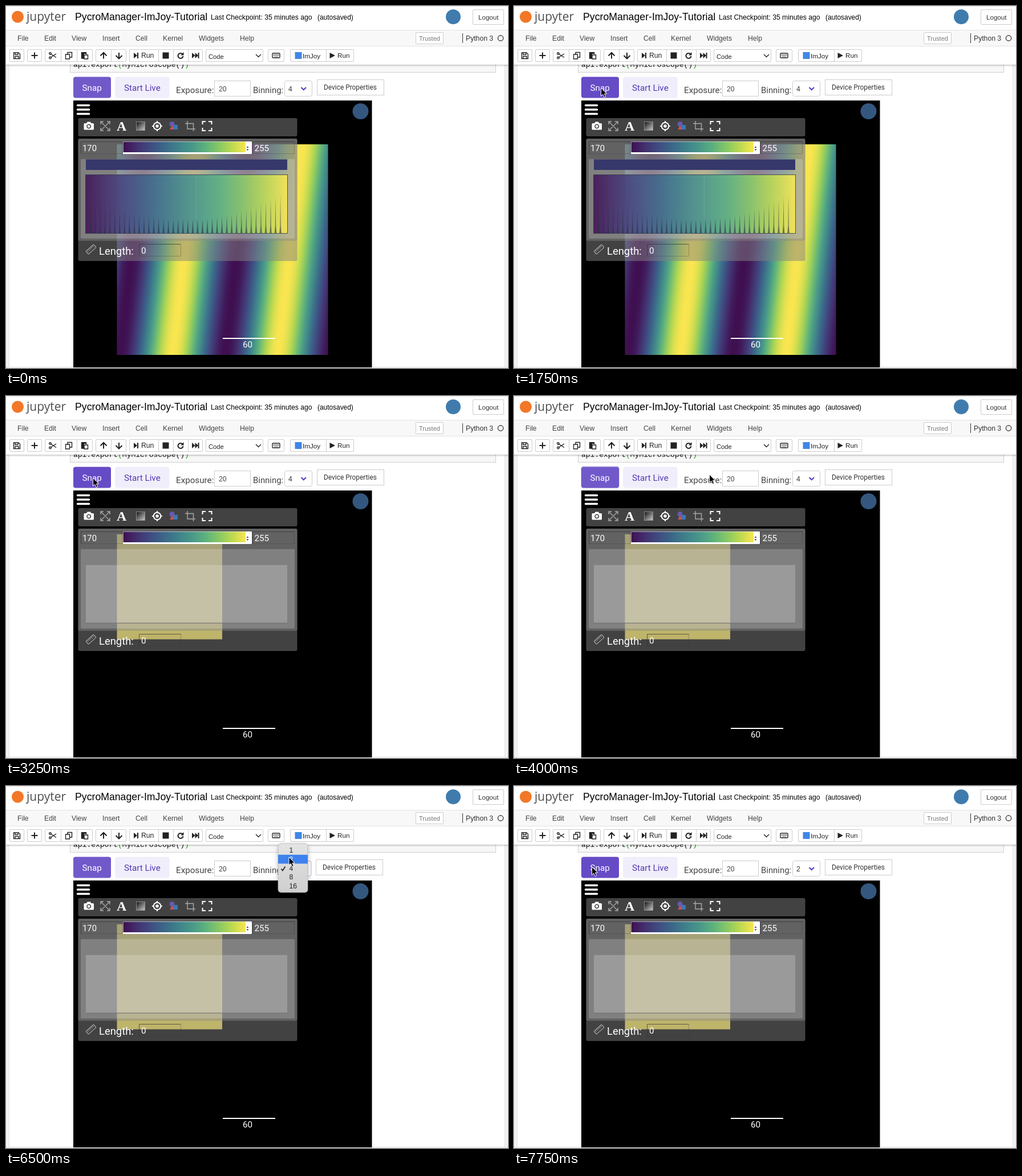
An HTML page that plays this animation: 880 px wide and 636 px high, repeating every 8 s.

```html
<!DOCTYPE html>
<html lang="en">
<head>
<meta charset="utf-8">
<title>Notebook viewer</title>
<style>
html, body { margin: 0; width: 100%; height: 100%; overflow: hidden; background: #fff; }
svg { display: block; width: 880px; height: 636px; }
text { font: 12.2px "Liberation Sans", Arial, sans-serif; white-space: pre; }
.ui { font: 15.2px Roboto, sans-serif; }
.mono { font: 13px "Liberation Mono", monospace; }
.btn { fill: #fff; stroke: #ccc; }
.line { fill: none; stroke: currentColor; stroke-width: 1.4; }
.thick { stroke-width: 2; }
</style>
</head>
<body>
<svg viewBox="0 0 880 636">
  <defs>
    <linearGradient id="stripes" gradientUnits="userSpaceOnUse" x1="200" y1="613" x2="382.1" y2="633.9" spreadMethod="repeat"></linearGradient>
    <linearGradient id="map"></linearGradient>
    <linearGradient id="gray" x2="1" y2="1"><stop stop-color="#111"/><stop offset="1" stop-color="#ccc"/></linearGradient>
    <linearGradient id="shade" x2="0" y2="1"><stop stop-color="#000" stop-opacity=".2"/><stop offset="1" stop-color="#000" stop-opacity="0"/></linearGradient>
    <linearGradient id="menuBg" x2="0" y2="1"><stop stop-color="#e4e4e4"/><stop offset="1" stop-color="#cfcfcf"/></linearGradient>
    <clipPath id="page"><rect y="103" width="880" height="533"/></clipPath>
    <filter id="soft" x="-40%" y="-30%" width="180%" height="170%"><feDropShadow dx="0" dy="4" stdDeviation="4" flood-opacity=".25"/></filter>
  </defs>

  <!-- page -->
  <rect width="880" height="636" fill="#fff"/>
  <rect y="103" width="5" height="533" fill="#f2f2f2"/>
  <rect x="875" y="103" width="5" height="533" fill="#f2f2f2"/>
  <path d="M5.5 103V635M874.5 103V635" stroke="#e0e0e0"/>
  <g clip-path="url(#page)">
    <rect x="112.5" y="90.5" width="746" height="26" fill="#f7f7f7" stroke="#cfcfcf"/>
    <text class="mono" x="118" y="107" fill="#111">api.export<tspan fill="#0a0">(</tspan>MyMicroscope()<tspan fill="#0a0">)</tspan></text>
  </g>
  <rect y="103" width="880" height="4" fill="url(#shade)"/>

  <!-- header -->
  <circle cx="20.5" cy="19" r="10.5" fill="#f37726"/>
  <text x="36" y="25.5" fill="#4e4e4e" style="font:21px 'Open Sans',sans-serif">jupyter</text>
  <text x="121" y="24.5" style="font-size:17.7px">PycroManager-ImJoy-Tutorial</text>
  <text x="359" y="24">Last Checkpoint: 35 minutes ago</text>
  <text x="546" y="24" style="font-size:11.9px">(autosaved)</text>
  <circle cx="784" cy="19" r="13" fill="#3f7cad"/>
  <rect class="btn" x="818.5" y="6.5" width="54" height="26" rx="1.5"/>
  <text x="828" y="23.5" fill="#333" style="font-size:11.6px">Logout</text>
  <rect y="42" width="880" height="29" fill="#f8f8f8"/>
  <path d="M0 .5H880M0 42.5H880M0 70.5H880" stroke="#e3e3e3"/>
  <g id="menuBar" fill="#444"></g>
  <rect class="btn" x="718.5" y="46.5" width="48" height="20" rx="1"/>
  <text x="724" y="60.5" fill="#777" style="font-size:11px">Trusted</text>
  <path d="M800.5 48V65" stroke="#333"/>
  <text x="806" y="60.5" fill="#333">Python 3</text>
  <circle cx="867" cy="56.5" r="4.7" class="line" color="#444"/>

  <!-- notebook toolbar -->
  <g id="bar"></g>
  <g color="#222" fill="#222">
    <path class="line" d="M13.5 82H22L24.5 84.5V92.5H13.5ZM16 82V85.5H21V82M16 92V88.5H22V92"/>
    <path class="line thick" d="M44.5 87H55.5M50 81.5V92.5M165.5 87.5L171 82 176.5 87.5M171 82.5V92.5M192.5 87L198 92.5 203.5 87M198 92V82"/>
    <path class="line" d="M78 84L88 90.5M78 90.5L88 84"/>
    <g class="line">
      <circle cx="77.5" cy="83.5" r="1.8"/><circle cx="77.5" cy="91" r="1.8"/>
      <path d="M108 85V81.5H115.5V90H112M104.5 85H111.5V93H104.5Z"/>
      <path d="M136.5 92H132.5V82H140.5V85M137 86H143.5V93H137Z"/>
    </g>
    <path d="M132 81H141V84H137V92H132Z"/>
    <path d="M224 82V92L230 87ZM230 82H232V92H230Z"/>
    <rect x="274.5" y="81.5" width="11" height="11"/>
    <path class="line thick" d="M309.5 84.5A4.5 4.5 0 1 0 310.5 88"/>
    <path d="M311.5 81V86.5H306Z"/>
    <path d="M326 82V92L331.5 87ZM331.5 82V92L337 87ZM336.5 82H338.5V92H336.5Z"/>
    <path class="line" d="M438 85L442.5 89.5 447 85"/>
    <rect class="line" x="467" y="83" width="13" height="8" rx="1"/>
    <path d="M469 85.5H478.5M469 87H478.5M470.5 89H477" stroke="#222" stroke-dasharray="1.2 .8"/>
    <rect x="506.5" y="81" width="12" height="12" fill="#3f86e6"/>
    <path d="M567.5 82V92L577 87Z"/>
    <text x="237" y="91">Run</text>
    <text x="355" y="92.5" style="font-size:11.2px">Code</text>
    <text x="520" y="91.5" style="font-size:11.7px">ImJoy</text>
    <text x="581" y="91" style="font-size:11.7px">Run</text>
  </g>

  <!-- control row -->
  <rect id="halo" x="117" y="123" width="68" height="39" rx="5" fill="#d9d2f2"/>
  <rect id="snap" x="118" y="124.5" width="66" height="37" rx="4"/>
  <text class="ui" x="133.5" y="149" fill="#fff">Snap</text>
  <rect x="191" y="124.5" width="95.5" height="37" rx="4" fill="#f1eefb"/>
  <text class="ui" x="207" y="149" fill="#5238b4">Start Live</text>
  <g fill="#444">
    <text class="ui" x="298" y="152.5">Exposure:</text>
    <rect class="btn" x="365.5" y="131.5" width="63" height="27"/>
    <text x="373" y="150">20</text>
    <text class="ui" x="433" y="152.5" style="font-size:14.9px">Binning:</text>
  </g>
  <rect id="select" class="btn" x="488.5" y="131.5" width="48" height="27" rx="3"/>
  <text id="bin" x="495" y="149.5" fill="#333"></text>
  <path d="M517.5 143L521.7 147.2 526 143" fill="none" stroke="#5740c0" stroke-width="2.2"/>
  <g id="props">
    <rect class="btn" x="545.5" y="129.5" width="117" height="27"/>
    <text class="ui" x="557" y="147" fill="#333" style="font-size:11.9px">Device Properties</text>
  </g>

  <!-- viewer -->
  <rect x="118" y="166" width="523.5" height="469" fill="#000"/>
  <rect id="wave" x="194.5" y="243" width="370" height="370" fill="url(#stripes)"/>
  <rect id="patch" x="194.5" y="243" width="184.5" height="184.5" fill="#f9e550"/>
  <path d="M125.5 174.5H145.5M125.5 182H145.5M125.5 189.5H145.5" stroke="#fff" stroke-width="3.5" stroke-linecap="round"/>
  <circle cx="621.5" cy="185" r="14" fill="#34577f"/>
  <path d="M380 584H472" stroke="#fff" stroke-width="2"/>
  <text class="ui" x="415" y="600" fill="#fff">60</text>

  <rect x="126.5" y="197" width="384" height="32" rx="3" fill="#424242"/>
  <g color="#fff" fill="#fff">
    <path fill-rule="evenodd" d="M138 206H141L142.5 203.5H148L149.5 206H152.5Q154 206 154 207.5V216Q154 217.500 152.5 217.5H138Q136.5 217.5 136.5 216V207.5Q136.5 206 138 206ZM145.2 207.5A4 4 0 1 0 145.3 207.5Z"/>
    <circle cx="145.2" cy="211.5" r="2.4"/>
    <path class="line" color="#aaa" d="M167 204L181 218M181 204L167 218M166 208V203H171M177 203H182V208M182 214V219H177M171 219H166V214"/>
    <text x="194" y="219" style="font:bold 24px 'Liberation Serif',serif">A</text>
    <rect x="228.5" y="203.5" width="15" height="15" fill="url(#gray)" stroke="#999" stroke-width=".8"/>
    <circle class="line thick" cx="265" cy="211" r="6.3"/><circle cx="265" cy="211" r="2.8"/>
    <path class="line thick" d="M265 202V205M265 217V220M256 211H259M271 211H274"/>
    <circle cx="291" cy="207.5" r="4.5" fill="#6658b0"/>
    <rect x="293" y="209" width="8" height="8" fill="#3978b8"/>
    <path d="M287 217L291 209.5 295 217Z" fill="#c55358"/>
    <path class="line" color="#aaa" d="M314 206.5H328.5V220M318 202V216H332"/>
    <path class="line thick" d="M344.500 208V203H350M355 203H360.5V208M360.5 214V219H355M350 219H344.5V214"/>
  </g>

  <rect x="126.5" y="233" width="384" height="215" rx="3" fill="rgba(132,132,132,.5)"/>
  <rect x="126.5" y="233" width="384" height="179.5" rx="3" fill="rgba(137,137,137,.45)"/>
  <rect x="131" y="269" width="375" height="139.5" rx="2" fill="rgba(248,248,248,.2)"/>
  <rect x="140" y="297" width="353" height="102.5" fill="rgba(237,237,237,.23)"/>
  <path id="base" d="M140 399H493" stroke="#666" stroke-width="1.2"/>
  <g id="hist">
    <rect x="140" y="269.5" width="353" height="18.5" fill="#36376b"/>
    <rect x="139.5" y="296.5" width="354" height="103" fill="url(#map)" fill-opacity=".88" stroke="#333546" stroke-opacity=".8"/>
    <path d="M333.5 297V374" stroke="#b5c5b5" stroke-opacity=".25"/>
    <path id="spikes" fill="#2b3148" fill-opacity=".6"/>
  </g>
  <g id="fields"></g>
  <rect x="205" y="238" width="226" height="22" rx="1.5" fill="#fff"/>
  <rect x="205.5" y="238.5" width="214.5" height="18.5" fill="url(#map)"/>
  <path d="M421.5 249L423.5 246.5 425.5 249ZM421.5 251.5L423.5 254 425.5 251.5Z" fill="#333"/>
  <g fill="#fff">
    <text class="ui" x="134" y="254.5" style="font-size:14.8px">170</text>
    <text class="ui" x="435.5" y="254.5">255</text>
    <text class="ui" x="163" y="437" style="font-size:18.4px">Length:</text>
    <text class="ui" x="237" y="435">0</text>
  </g>
  <g transform="translate(149 427.5) rotate(-42)" fill="none" stroke="#bbb">
    <rect x="-9" y="-3.5" width="18" height="7" rx="1"/><path d="M-6 -3V0M-3 -3V0M0 -3V0M3 -3V0M6 -3V0"/>
  </g>
  <path d="M0 634.5H118M641.5 634.5H880" stroke="#ddd"/>

  <!-- popup and pointer -->
  <g id="menu">
    <rect x="477" y="101" width="52" height="86" rx="5" fill="url(#menuBg)" stroke="#aaa" stroke-width=".7" filter="url(#soft)"/>
    <rect id="pick" x="477" width="52" height="15.6" fill="#3d82ee"/>
    <g id="items"></g>
    <path id="check" d="M482.5 145.5L485 148.5 489.5 141.5" fill="none" stroke-width="1.7"/>
  </g>
  <path id="cursor" d="M0 0V14.2L3.3 11.2 5.6 16.6 8.2 15.5 5.9 10.2H10.2Z" fill="#000" stroke="#fff"/>
</svg>
<script>
const $ = id => document.getElementById(id);
const NS = 'http://www.w3.org/2000/svg';
const STEP = 250, LOOP = 8000;

function add(parent, tag, attrs, text = '') {
  const el = document.createElementNS(NS, tag);
  for (const k in attrs) el.setAttribute(k, attrs[k]);
  el.textContent = text;
  return parent.appendChild(el);
}

// Colour map
const MAP = ['3f0f50', '43306f', '3f4c82', '3b6788', '3f808a', '489789', '5cb07d', '85c766', 'bcd950', 'f9e550']
  .map(h => [0, 2, 4].map(i => parseInt(h.slice(i, i + 2), 16)));
function colour(v) {
  const p = v * (MAP.length - 1), i = Math.min(Math.floor(p), MAP.length - 2);
  return `rgb(${MAP[i].map((c, k) => Math.round(c + (MAP[i + 1][k] - c) * (p - i)))})`;
}
function fillStops(id, n, curve) {
  for (let i = 0; i <= n; i++) add($(id), 'stop', { offset: i / n, 'stop-color': colour(curve(i / n)) });
}
fillStops('map', 18, u => u);
fillStops('stripes', 48, u => 0.5 - 0.5 * Math.cos(2 * Math.PI * u));

// Histogram peaks
let peaks = '';
for (let i = 0; i < 40; i++) {
  const x = 148 + i * 8.54, u = Math.abs(i / 19.5 - 1);
  peaks += `M${x - 1.8} 399L${x - .7} 386 ${x} ${375 - 45 * u ** 2.2} ${x + .7} 386 ${x + 1.8} 399Z`;
}
$('spikes').setAttribute('d', peaks);

// Inset fields: dark upper left, faint lower right
for (const [x, y, w, h] of [[131.5, 238.5, 72.5, 21], [432.5, 238.5, 73, 21], [233.5, 418.5, 73, 21]]) {
  const edge = { fill: 'none', stroke: '#333' };
  add($('fields'), 'path', { ...edge, d: `M${x} ${y + h}V${y}H${x + w}`, 'stroke-opacity': .7 });
  add($('fields'), 'path', { ...edge, d: `M${x} ${y + h}H${x + w}V${y}`, 'stroke-opacity': .3 });
}

// Menu bar and toolbar buttons
const MENUS = { File: 20, Edit: 67, View: 115, Insert: 169, Cell: 227, Kernel: 275, Widgets: 338, Help: 410 };
for (const name in MENUS) add($('menuBar'), 'text', { x: MENUS[name], y: 60.5 }, name);

const GROUPS = [[6, 32], [37, 63], [68, 96, 124, 152], [157, 184, 211], [216, 267, 293, 319, 345], [350, 451], [459, 488], [498, 561, 610]];
for (const g of GROUPS) {
  const end = g[g.length - 1];
  add($('bar'), 'rect', { class: 'btn', x: g[0] + .5, y: 76.5, width: end - g[0] - 1, height: 21, rx: 1.5 });
  for (const x of g.slice(1, -1)) add($('bar'), 'path', { d: `M${x + .5} 77V98`, stroke: '#ccc' });
}

const ITEMS = [1, 2, 4, 8, 16].map((n, i) =>
  add($('items'), 'text', { x: 496.5, y: 117 + i * 15.8 }, n));

// Pointer positions: time, x, y
const PATH = [
  [250, 365, 86], [500, 292, 112], [750, 216, 130], [1000, 150, 141], [1250, 152.5, 144],
  [4000, 342.5, 138], [4250, 470, 122], [4500, 600, 108], [4750, 674, 147], [5000, 710, 86],
  [5250, 611, 115], [5500, 533, 138], [5750, 522, 144], [6000, 508, 145], [6250, 502, 139],
  [6500, 496, 125], [7000, 400, 138], [7250, 230, 150], [7500, 129, 152], [7750, 136.5, 142]
];

const show = (id, on) => $(id).setAttribute('visibility', on ? 'visible' : 'hidden');
const within = (t, a, b) => t >= a && t < b;

function draw(t) {
  const at = PATH.filter(p => p[0] <= t).pop();
  show('cursor', at);
  if (at) $('cursor').setAttribute('transform', `translate(${at[1]} ${at[2]})`);

  const snapped = t >= 2000;
  show('wave', !snapped);
  show('hist', !snapped);
  show('patch', snapped);
  show('base', t >= 3250);

  const hover = within(t, 1750, 4000) || t >= 7500;
  $('snap').setAttribute('fill', hover ? '#664bc6' : '#7159ca');
  show('halo', within(t, 3500, 5750));

  const open = within(t, 6000, 6750), pick = t < 6500 ? 2 : 1;
  show('menu', open);
  $('pick').setAttribute('y', 105 + pick * 15.8);
  ITEMS.forEach((el, i) => el.setAttribute('fill', i === pick ? '#fff' : '#222'));
  $('check').setAttribute('stroke', pick === 2 ? '#fff' : '#222');

  const narrow = within(t, 6000, 7750);
  $('select').setAttribute('width', narrow ? 46.5 : 48);
  $('select').style.stroke = narrow ? '#b9aee2' : '';
  $('props').setAttribute('transform', `translate(${narrow ? -2 : 0} 0)`);
  $('bin').textContent = t < 6750 ? 4 : 2;
}

let last = -1;
function tick() {
  const t = Math.floor(performance.now() % LOOP / STEP) * STEP;
  if (t !== last) draw(last = t);
  requestAnimationFrame(tick);
}
tick();
</script>
</body>
</html>
```
